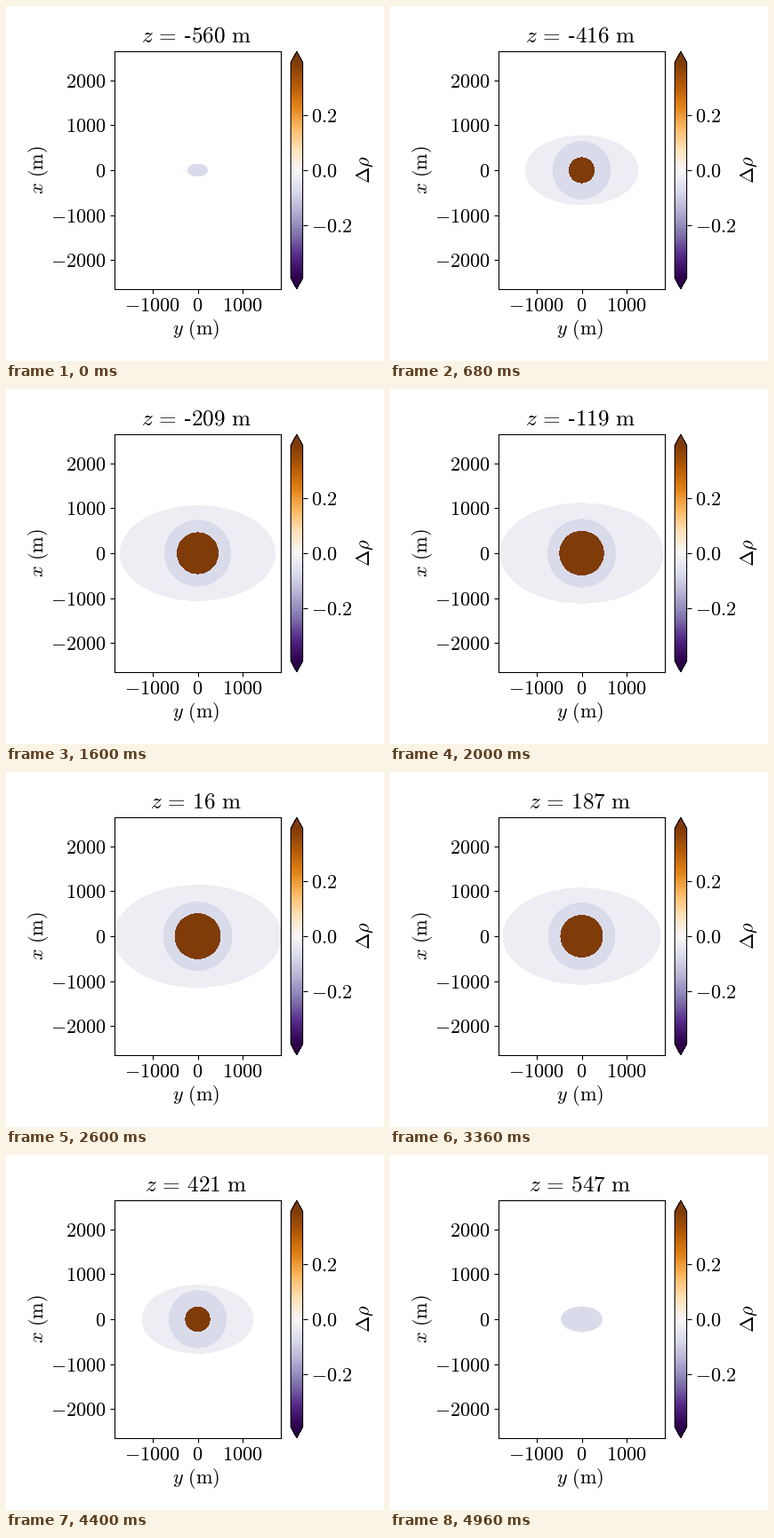
A matplotlib script that plays this animation: 425x400 px, repeating every 5000 ms.

```python
import math

import matplotlib.pyplot as plt
from matplotlib.animation import FuncAnimation
from matplotlib.cm import ScalarMappable
from matplotlib.colors import Normalize
from matplotlib.patches import Ellipse

W, H, DPI = 425, 400, 100
TICKS = 125
INTERVAL = 40

# Body geometry in metres: triaxial ellipsoid, inner shell, dense core
SEMI_Y, SEMI_X, SEMI_Z = 1845, 1132, 564.2
R_SHELL, R_CORE = 760, 500
Z_START, Z_STEP = -560, 9

plt.rcParams.update({
    "mathtext.fontset": "cm",
    "font.size": 16,
    "axes.linewidth": 0.8,
})


def pixel_axes(left, top, right, bottom):
    return fig.add_axes([left / W, 1 - bottom / H,
                         (right - left) / W, (bottom - top) / H])


def label(x, y, text, **kw):
    return fig.text(x / W, 1 - y / H, text, ha="center", **kw)


def vertical_label(baseline, y, text):
    fig.text(baseline / W, 1 - y / H, text, rotation=90,
             rotation_mode="anchor", ha="center", va="baseline")


def math_labels(values):
    return [f"${v}$" for v in values]


def section(radius, z):
    """Radius of the circle where the plane at height z cuts a sphere."""
    return math.sqrt(max(0, radius ** 2 - z ** 2))


fig = plt.figure(figsize=(W / DPI, H / DPI), dpi=DPI, facecolor="white")
cmap = plt.get_cmap("PuOr_r")
norm = Normalize(-0.392, 0.392)

ax = pixel_axes(122.4, 51.4, 308.6, 318.6)
ax.set_xlim(-1836, 1836)
ax.set_ylim(-2634, 2634)
y_ticks = [-1000, 0, 1000]
x_ticks = [-2000, -1000, 0, 1000, 2000]
ax.set_xticks(y_ticks, math_labels(y_ticks))
ax.set_yticks(x_ticks, math_labels(x_ticks))

cax = pixel_axes(320.2, 51.4, 333.6, 318.6)
bar = fig.colorbar(ScalarMappable(norm, cmap), cax=cax, extend="both")
bar_ticks = [-0.2, 0.0, 0.2]
bar.set_ticks(bar_ticks, labels=math_labels(bar_ticks))

title = label(213.7, 40.6, "", fontsize=18.2, va="baseline")
label(214, 370.4, r"$y\ \mathrm{(m)}$", va="baseline")
vertical_label(41.5, 185, r"$x\ \mathrm{(m)}$")
vertical_label(408.5, 184, r"$\Delta\rho$")


def blob(density, zorder):
    patch = Ellipse((0, 0), 0, 0, facecolor=cmap(norm(density)),
                    linewidth=0, antialiased=False, zorder=zorder)
    return ax.add_patch(patch)


body = blob(-0.025, 1)
shell = blob(-0.076, 1.1)
core = blob(0.5, 1.2)


def resize(patch, half_width, half_height):
    patch.set_width(2 * half_width)
    patch.set_height(2 * half_height)


def draw(i):
    # The first slice is held for two ticks
    z = Z_START + Z_STEP * max(0, i - 1)
    scale = section(1, z / SEMI_Z)
    resize(body, SEMI_Y * scale, SEMI_X * scale)
    resize(shell, section(R_SHELL, z), section(R_SHELL, z))
    resize(core, section(R_CORE, z), section(R_CORE, z))
    shell.set_clip_path(body)
    core.set_visible(abs(z) < R_CORE)
    sign = "\u2010" if z < 0 else ""
    title.set_text(rf"$z\,=\,\mathrm{{{sign}{abs(z)}\ m}}$")
    return body, shell, core, title


anim = FuncAnimation(fig, draw, frames=TICKS, interval=INTERVAL,
                     repeat=True, repeat_delay=0, blit=False)
plt.show()
```
